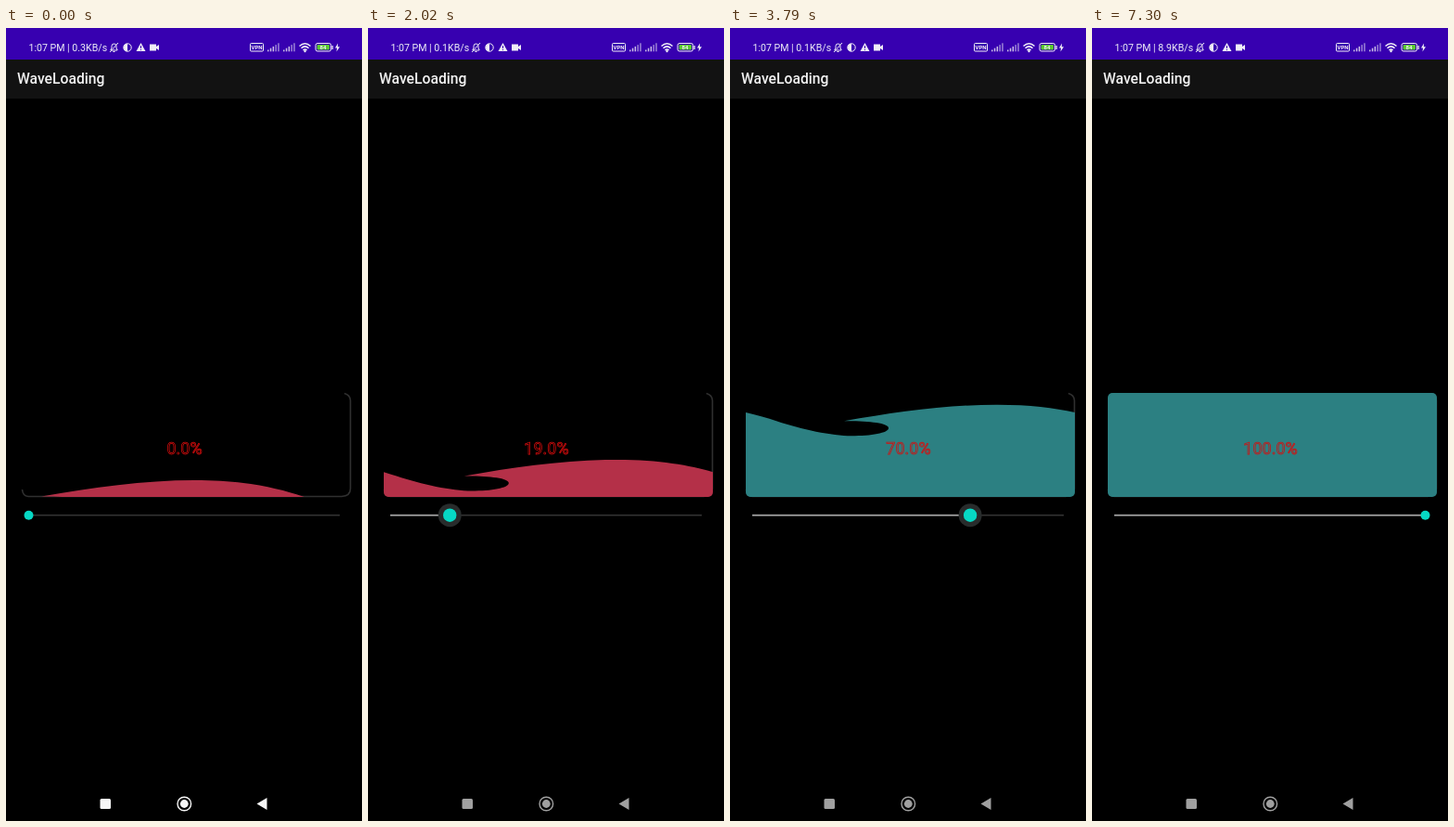
An HTML page for the animation above (7340 ms loop, 384x854 px).

```html
<!DOCTYPE html>
<html lang="en">
<head>
<meta charset="utf-8">
<title>Wave loading</title>
<style>
html, body { margin: 0; width: 100%; height: 100%; overflow: hidden; background: #000; }
svg { display: block; width: 100vw; height: 100vh; }
text { font-family: Roboto, sans-serif; }
</style>
</head>
<body>
<svg viewBox="0 0 384 854">
  <defs>
    <clipPath id="box"><rect x="17" y="393" width="355" height="112" rx="5"/></clipPath>
  </defs>
  <rect width="384" height="854"/>
  <rect width="384" height="34" fill="#3700b0"/>
  <rect y="34" width="384" height="42" fill="#121212"/>
  <text x="12" y="60.3" font-size="15.7" font-weight="500" fill="#f2f2f2">WaveLoading</text>

  <!-- status bar -->
  <g fill="#f0eef6" stroke="none">
    <text id="clock" x="24.5" y="25" font-size="10.6"></text>
    <g fill="none" stroke="#f0eef6">
      <path d="M113 24V23L114 22V19.500Q114 17 116.500 17T119 19.500V22L120 23V24ZM115.500 25.500H117.500M112 26L121 16"/>
      <circle cx="131" cy="21" r="4.200"/>
      <rect x="263.500" y="16.500" width="14" height="8.500" rx="1"/>
      <path d="M316.500 19.500Q322.500 14 328.500 19.500M318.500 21.800Q322.500 18 326.500 21.800M320.500 24Q322.500 22 324.500 24" stroke-width="1.500"/>
      <rect x="334" y="16.500" width="16.500" height="8.500" rx="2"/>
    </g>
    <path d="M131 17A4 4 0 0 0 131 25Z"/>
    <path d="M145.500 16L150.500 25H140.500Z"/>
    <path d="M145.500 19V22M145.500 23V24" stroke="#3700b0"/>
    <path d="M155 17.500H162V20L165 18V24L162 22V24.500H155Z"/>
    <circle cx="322.500" cy="25" r="1.200"/>
    <text x="270.500" y="23.300" font-size="6" font-weight="700" text-anchor="middle">VPN</text>
    <g id="bars"></g>
    <rect x="335.500" y="18" width="13.500" height="5.500" rx="1" fill="#58c830"/>
    <rect x="351.500" y="19" width="1.300" height="4"/>
    <text x="342" y="23.200" font-size="6" font-weight="700" text-anchor="middle">84</text>
    <path d="M358 16.500L355 21.500H357L356.500 25.500L360 20.200H357.800Z"/>
  </g>

  <!-- loading box -->
  <path d="M17.500 497Q18 504 24 504.500H362Q371.500 504 371.500 496V401Q371 395 365 393.500" fill="none" stroke="#303030" stroke-width="1.600"/>
  <path id="wave" clip-path="url(#box)"/>
  <text id="label" x="192.500" y="459" font-size="18" text-anchor="middle" fill="none" stroke="#d80c0c" stroke-width=".75"></text>

  <!-- slider -->
  <rect x="24" y="523.900" width="336" height="1.600" fill="#333"/>
  <rect id="track" x="24" y="523.900" height="1.600" fill="#a8a8a8"/>
  <circle id="halo" cy="524.700" fill="#282c2c"/>
  <circle id="thumb" cy="524.700" fill="#06d8c4"/>

  <!-- navigation -->
  <g id="nav">
    <rect x="101.500" y="830" width="11.500" height="11" rx="1.500"/>
    <circle cx="192.300" cy="835.500" r="7.300" fill="none" stroke-width="1.400"/>
    <circle cx="192.300" cy="835.500" r="4.400"/>
    <path d="M270.500 835.500L281.500 829V842Z"/>
  </g>
</svg>
<script>
const LOOP = 7340, PERIOD = 355;
const DRAG = [[0, 0], [1320, 0], [2020, 19], [2720, 38], [3790, 70], [4800, 100], [LOOP, 100]];
const $ = id => document.getElementById(id);
const set = (id, attrs) => {
  for (const k in attrs) $(id).setAttribute(k, attrs[k]);
};
const clamp = v => Math.max(0, Math.min(1, v));
const ramp = (t, a, b) => clamp((t - a) / (b - a));

// Two signal meters
$('bars').innerHTML = [282, 299].map(x => [0, 1, 2, 3, 4].map(i =>
  `<rect x="${x + i * 2.8}" y="${23.5 - i * 1.8}" width="1.5" height="${1.8 + i * 1.8}" opacity="${i < 3 ? 0.8 : 0.55}"/>`
).join('')).join('');

function progressAt(t) {
  const i = DRAG.findIndex(p => p[0] > t);
  const [t0, a] = DRAG[i - 1], [t1, b] = DRAG[i];
  return a + (b - a) * (t - t0) / (t1 - t0);
}

// A crest followed by a trough that curls back under the next crest
const CURL = 'c55-9.5 110-17.5 165-17.5s90 8.5 117 17.5' +
  's60 16 81 16s40-3 40-8.500s-23-7.800-48-7.500';

// The wave drifts right, gaining speed slightly
const driftAt = t => 38 + 0.2065 * t + 8.5e-7 * t * t;

function wavePath(t, p) {
  if (p >= 100) return 'M17 393h355v112h-355z';
  const x = driftAt(t) % PERIOD - 2 * PERIOD;
  return `M${x} 520V${504.5 - 1.16 * p}${CURL.repeat(4)}V520Z`;
}

function draw(t) {
  const p = progressAt(t), shown = Math.round(p);
  const x = 24.5 + 3.35 * p;
  const press = ramp(t, 1220, 1350) * (1 - ramp(t, 5450, 5720));
  const haloFade = ramp(t, 1220, 1350) * (1 - ramp(t, 5450, 5850));
  const rate = t < 1600 ? '0.3' : t < 6000 ? '0.1' : '8.9';
  $('clock').textContent = `1:07 PM | ${rate}KB/s`;
  $('label').textContent = shown + '.0%';
  set('wave', {
    d: wavePath(t, p),
    fill: shown < 33 ? '#b43048' : shown < 66 ? '#f99e6a' : '#2c8082'
  });
  set('track', { width: x - 24 });
  set('thumb', { cx: x, r: 5 + 2.2 * press });
  set('halo', { cx: x, r: 9 + 3.5 * press, opacity: haloFade });
  const gray = Math.round(246 - 86 * ramp(t, 0, 400));
  const color = `rgb(${gray},${gray},${gray})`;
  set('nav', { fill: color, stroke: color, 'stroke-width': 0 });
}

const start = performance.now();
function tick(now) {
  draw(Math.max(0, now - start) % LOOP);
  requestAnimationFrame(tick);
}
draw(0);
requestAnimationFrame(tick);
</script>
</body>
</html>
```
